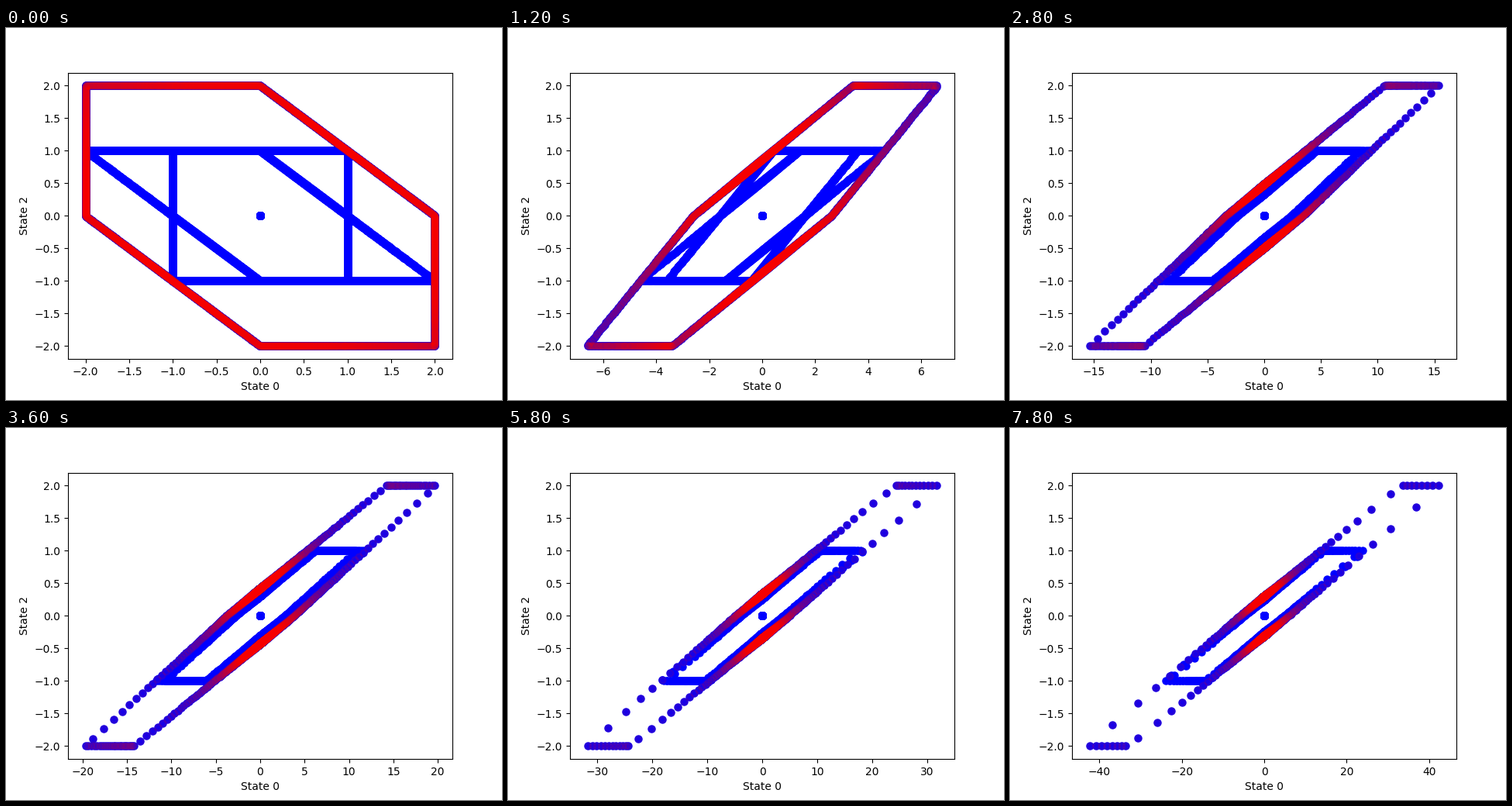
These frames come from a looping animation (640x480 px, 8 s). A matplotlib script:

```python
import numpy as np
import matplotlib.pyplot as plt
from matplotlib.animation import FuncAnimation

FRAMES = 40
STEP_MS = 200

# One ray from the origin every tenth of a degree
angles = np.radians(np.arange(3600) / 10)
rays = np.column_stack([np.cos(angles), np.sin(angles)])


def boundary(*gens):
    """Points where the rays leave the zonotope spanned by gens."""
    g = np.array(gens)
    normals = np.column_stack([-g[:, 1], g[:, 0]])
    support = np.abs(normals @ g.T).sum(axis=1)
    reach = np.abs(rays @ normals.T)
    radius = (support / np.maximum(reach, 1e-12)).min(axis=1)
    return rays * radius[:, None]


def generators(t):
    return (1 + 0.1 * t, 0), (0.5 * t - 1, 1), (0.5 * t, 1)


fig, ax = plt.subplots(figsize=(6.4, 4.8), dpi=100)
ax.set_xlabel("State 0")
ax.set_ylabel("State 2")

style = dict(marker="o", linestyle="none", markersize=6, markeredgewidth=1.5)
blue, = ax.plot([], [], color="b", **style)
red, = ax.plot([], [], color="r", alpha=0.1, **style)


def update(t):
    a, b, c = generators(t)
    hull = boundary(a, b, c)
    center = np.zeros((400, 2))
    inner = np.vstack([center, boundary(a, b), boundary(a, c), hull])
    blue.set_data(inner[:, 0], inner[:, 1])
    red.set_data(hull[:, 0], hull[:, 1])
    ax.relim()
    ax.autoscale_view()
    return blue, red


anim = FuncAnimation(fig, update, frames=FRAMES, interval=STEP_MS,
                     init_func=lambda: update(0), repeat=True, repeat_delay=0)
plt.show()
```
